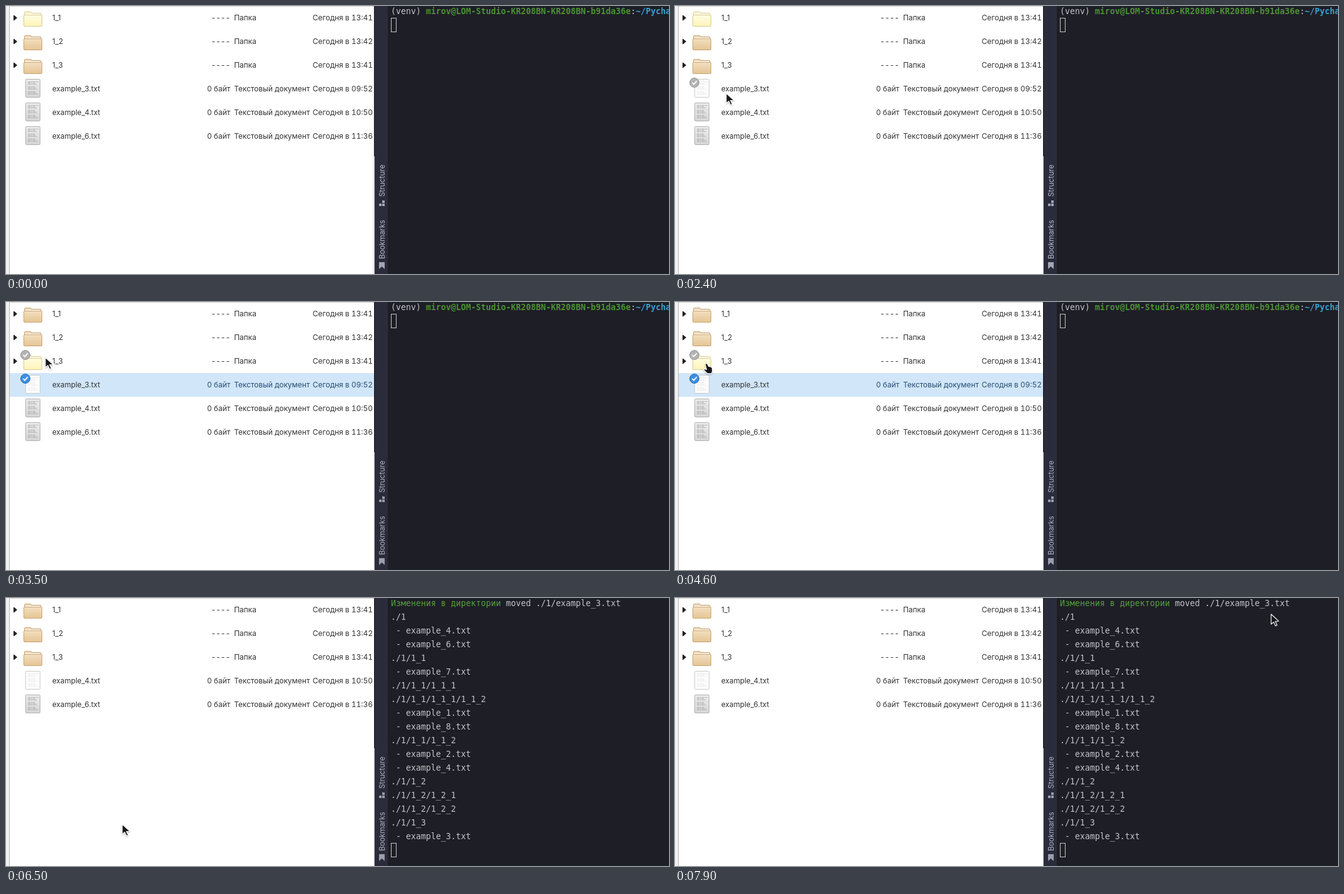
Recreate the animation shown at these times as an HTML page. Size 1061 by 430 pixels, loop 8 s.

```html
<!DOCTYPE html>
<html lang="ru">
<head>
<meta charset="utf-8">
<style>
  html, body { margin: 0; width: 100%; height: 100%; overflow: hidden; background: #fff; }
  svg { display: block; width: 1061px; height: 430px; }
  text { white-space: pre; }
  .ui { font: 11.8px Inter, "Open Sans", sans-serif; fill: #333; }
  .meta { font-size: 11.95px; font-variant-numeric: tabular-nums; }
  .end { text-anchor: end; }
  .picked .meta { fill: #264d72; }
  .side { fill: #b8bbc6; }
  .mono { font: 13.29px "DejaVu Sans Mono", "Noto Sans Mono", monospace; fill: #c3c4c8; }
  .user { font-weight: bold; fill: #4b9136; }
  .path { font-weight: bold; fill: #3a9fd0; }
  .note { fill: #55a13d; }
</style>
</head>
<body>
<svg viewBox="0 0 1061 430">
  <defs>
    <linearGradient id="tan" x2="0" y2="1"><stop stop-color="#f3dfbf"/><stop offset="1" stop-color="#e4c594"/></linearGradient>
    <linearGradient id="cream" x2="0" y2="1"><stop stop-color="#fffde0"/><stop offset="1" stop-color="#fff3b8"/></linearGradient>
    <linearGradient id="sheet" x2="0" y2="1"><stop stop-color="#ececec"/><stop offset="1" stop-color="#d6d6d6"/></linearGradient>
    <linearGradient id="edge"><stop stop-color="#000" stop-opacity="0"/><stop offset="1" stop-color="#000" stop-opacity=".08"/></linearGradient>
    <filter id="soft" x="-50%" y="-50%" width="200%" height="200%"><feDropShadow dx="0" dy="1" stdDeviation="1" flood-opacity=".35"/></filter>
  </defs>
  <rect width="1061" height="430" fill="#fff"/>
  <rect width="5" height="430" fill="#f1f1f1"/>
  <rect x="5" width="1" height="430" fill="#b4b4b4"/>
  <rect x="6" width="583" height="1" fill="#cfcfcf"/>
  <g id="list"></g>
  <rect id="shade" x="585" width="4" height="430" fill="url(#edge)"/>
  <rect x="589" width="1" height="241" fill="#101116"/>
  <rect x="589" y="241" width="1" height="189" fill="#b4b5bb"/>
  <rect x="590" width="21" height="430" fill="#2b2c3b"/>
  <rect x="611" width="450" height="430" fill="#1e1e26"/>
  <g id="tools">
    <text class="ui side" transform="translate(606 306) rotate(-90)">Structure</text>
    <text class="ui side" transform="translate(606 406) rotate(-90)">Bookmarks</text>
    <path d="M602 312h4v4h-4zM597 317h4v4h-4zM602 317h4v4h-4z" fill="#a4a7b2"/>
    <path d="M597 411h9v11l-4.5 -4 -4.5 4z" fill="#a4a7b2"/>
  </g>
  <g id="term"></g>
  <g id="pointer" filter="url(#soft)"></g>
</svg>
<script>
const LOOP = 8000, STEP = 100, ROW = 38;
const APPEAR = 1000, UNSHADE = 2400, SELECT = 2600, DROP = 4900, OUTPUT = 5200;
const el = id => document.getElementById(id);
const smooth = p => p * p * (3 - 2 * p);

const folders = [["1_1", "13:41"], ["1_2", "13:42"], ["1_3", "13:41"]];
const files = [["example_3.txt", "09:52"], ["example_4.txt", "10:50"], ["example_6.txt", "11:36"]];

// pointer moves: start, end, and where it comes to rest
const entry = [100, 60];
const moves = [
  [1000, 1300, 75, 157], [1500, 1900, 82, 140], [2800, 3200, 68, 92],
  [3300, 3500, 63, 89], [4000, 4300, 49, 132], [4400, 4600, 45, 98],
  [4800, 5100, 51, 123], [5100, 5500, 127, 367],
  [6400, 6500, 186, 363], [6500, 7000, 915, 42], [7000, 7200, 813, 25],
  [7500, 7900, 954, 26]
];

function pointerAt(t) {
  if (t < APPEAR) return null;
  let [x, y] = entry;
  for (const [from, to, x1, y1] of moves) {
    if (t < from) break;
    const p = smooth(Math.min(1, (t - from) / (to - from)));
    x += (x1 - x) * p;
    y += (y1 - y) * p;
    if (t < to) break;
  }
  return [Math.round(x), Math.round(y)];
}

const label = (x, y, s, cls = "") => `<text x="${x}" y="${y}" class="ui ${cls}">${s}</text>`;

function folder(c, lit) {
  const line = lit ? "#d8ca93" : "#c7a678";
  return `<g transform="translate(28 ${c})" stroke="${line}">
    <path d="M1.5 -3V-8.5q0 -1 1 -1h9q1 0 1.5 2h14q1 0 1 1V-3z" fill="${lit ? "#fff8d2" : "#efdabb"}"/>
    <path d="M3 -6h24v3H3z" fill="#fff" stroke="none"/>
    <rect x=".5" y="-4.5" width="29" height="18" rx="1.5" fill="url(#${lit ? "cream" : "tan"})"/></g>`;
}

function sheet(c, lit) {
  let lines = "";
  for (let i = 0; i < 11; i++)
    if (i % 4 < 3) lines += `M35 ${c - 11.5 + i * 2}h${17 - i * 5 % 7}`;
  return `<rect x="31.5" y="${c - 15.5}" width="23" height="29" rx="1" fill="${lit ? "#fdfdfd" : "url(#sheet)"}" stroke="${lit ? "#cacaca" : "#b0b0b0"}"/>
    <path d="${lines}" stroke="${lit ? "#e6e6e6" : "#a6a6a6"}" stroke-width=".9" stroke-dasharray="4 .8 2 .8"/>`;
}

function badge(c, blue) {
  return `<circle cx="31" cy="${c - 10}" r="7.5" fill="${blue ? "#3d8fe0" : "#b3b3b3"}" stroke="${blue ? "#2a6cb5" : "#979797"}"/>
    <path d="M27.5 ${c - 10}l2.5 2.6 4.8 -5.2" fill="none" stroke="#fff" stroke-width="1.8"/>`;
}

function drawList(t, pos) {
  const items = folders.concat(t < DROP ? files : files.slice(1));
  const picked = t >= SELECT && t < DROP ? 3 : -1;
  const hover = pos && pos[0] < 589 ? Math.floor(pos[1] / ROW) : -1;
  el("list").innerHTML = items.map(([name, time], i) => {
    const c = ROW * (i + 0.5), dir = i < folders.length, sel = i === picked;
    const lit = i === hover || sel || (i === 0 && t < SELECT) || (i === 3 && t >= OUTPUT);
    return `<g class="${sel ? "picked" : ""}">` +
      (sel ? `<rect x="6" y="${c - 19}" width="583" height="${ROW}" fill="#d1e6f9"/>` : "") +
      (dir ? `<path d="M12.5 ${c - 4}l5 4 -5 4z" fill="#222" stroke="#222" stroke-linejoin="round"/>` : "") +
      (dir ? folder(c, lit) : sheet(c, lit)) +
      (i === hover || sel ? badge(c, sel) : "") +
      label(74, c + 4, name) +
      label(359, c + 4, dir ? "----" : "0 байт", "meta end") +
      label(365, c + 4, dir ? "Папка" : "Текстовый документ", "meta") +
      label(587, c + 4, "Сегодня в " + time, "meta end") + "</g>";
  }).join("");
}

const prompt = `(venv) <tspan class="user">mirov@LOM-Studio-KR208BN-KR208BN-b91da36e</tspan>:<tspan class="path">~/Pycha</tspan>`;

// directory -> numbers of the example files inside
const tree = {
  "": [4, 6], "/1_1": [7], "/1_1/1_1_1": [], "/1_1/1_1_1/1_1_2": [1, 8], "/1_1/1_1_2": [2, 4],
  "/1_2": [], "/1_2/1_2_1": [], "/1_2/1_2_2": [], "/1_3": [3]
};
const report = [`<tspan class="note">Изменения в директории</tspan> moved ./1/example_3.txt`].concat(
  ...Object.entries(tree).map(([dir, list]) => ["./1" + dir, ...list.map(n => ` - example_${n}.txt`)]));

function drawTerm(t) {
  const lines = t < OUTPUT ? [prompt] : report;
  el("term").innerHTML = lines.map((s, i) => `<text class="mono" x="616" y="${13 + 22 * i}">${s}</text>`).join("") +
    `<rect x="616.5" y="${22 * lines.length - 2.5}" width="8" height="22" fill="none" stroke="#c4c4c8"/>`;
}

const arrow = "M0 0V16l4 -3.4 2.9 6.2 2.7 -1.3 -2.9 -5.9 5.3 -.4z";
const hand = "M4 1q2 -1 3 1l2 3.5q1 -1 2 .4 1 -.5 2 .8 1 0 1.5 1.300l.3 4.700 -1.300 4.200H7L2 12q-2 -2 0 -2.500l3.500 1L4 4Q3 2 4 1z";

function drawPointer(pos) {
  if (!pos) { el("pointer").innerHTML = ""; return; }
  const [x, y] = pos, onIcon = x < 61 && y < 190;
  el("pointer").innerHTML = `<path transform="translate(${x} ${y})" d="${onIcon ? hand : arrow}" fill="#17171a" stroke="#fff" stroke-width="1.1" stroke-linejoin="round"/>`;
}

function render(t) {
  const pos = pointerAt(t);
  drawList(t, pos);
  drawTerm(t);
  drawPointer(pos);
  el("shade").style.display = t < UNSHADE ? "" : "none";
  el("tools").style.opacity = t < SELECT ? 1 : 0.93;
}

let last = -1;
const start = performance.now();
function tick() {
  const t = Math.floor(((performance.now() - start) % LOOP) / STEP) * STEP;
  if (t !== last) render(last = t);
  requestAnimationFrame(tick);
}
tick();
</script>
</body>
</html>
```
